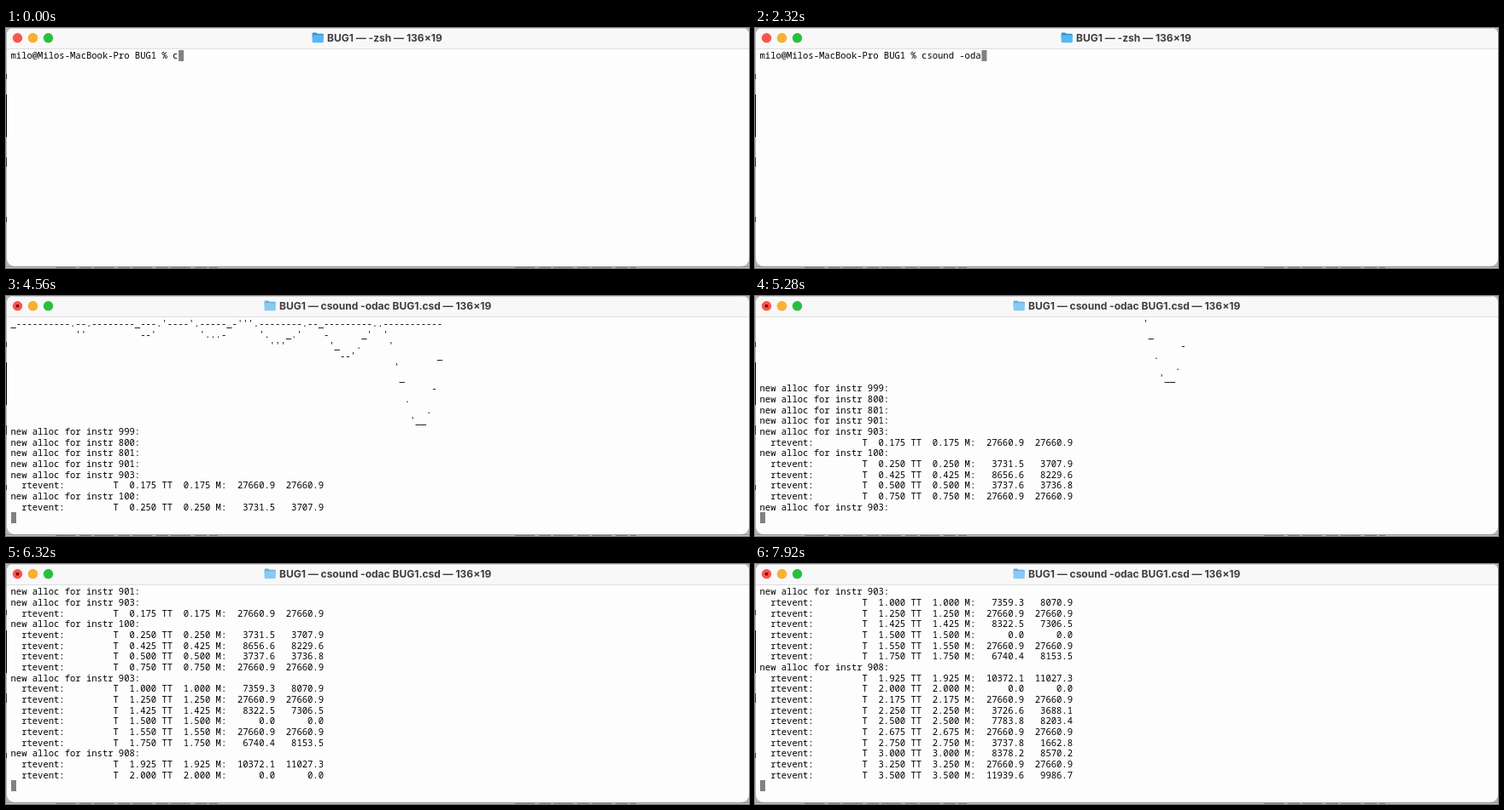
Animation of 870x282 px, one loop 8 s. Source, as an HTML page:

```html
<!DOCTYPE html>
<html lang="en">
<head>
<meta charset="utf-8">
<title>Terminal session</title>
<style>
  html, body { margin: 0; width: 100%; height: 100%; overflow: hidden; }
  #stage { position: relative; width: 870px; height: 282px; overflow: hidden; background: #b4b4b4; }
  #stage * { position: absolute; box-sizing: border-box; }
  #backdrop, #chrome { left: 0; top: 0; }
  #window { left: 1px; top: 0; width: 869px; height: 280px; border-radius: 8px 8px 9px 9px;
    background: #fdfdfd; overflow: hidden; }
  #bar { left: 0; top: 0; width: 100%; height: 25px; background: #f8f8f8;
    border-top: 1px solid #d2d2d2; border-bottom: 1px solid #dedede; }
  #title { top: 3px; font: 700 12px/17px Inter, sans-serif; color: #3d3d3d; white-space: pre; }
  #screen { left: 5.5px; top: 26.2px; margin: 0; color: #000; white-space: pre;
    font: 500 10.545px/12.667px "Noto Sans Mono", monospace; }
  #cursor { left: 5.5px; top: 26.2px; width: 6.33px; height: 12.7px; background: #818181; }
  .mark { top: 28px; width: 3px; height: 10px; border: 1px solid #a5a5a5; }
  #open { left: 2px; border-right: 0; }
  #close { left: 867px; border-left: 0; }
</style>
</head>
<body>
<div id="stage">
  <svg id="backdrop" width="870" height="282">
    <path d="M0 280.5H870" stroke="#929292"/>
    <path d="M0 281.5H870" stroke="#c4c4c4"/>
    <path d="M58 281.5H248M596 281.5H738" stroke="#858585" stroke-dasharray="23 5 14 3"/>
    <path d="M.5 54V60M.5 152V163M.5 222V228" stroke="#333"/>
    <path d="M.5 78V128" stroke="#000"/>
  </svg>
  <div id="window"><div id="bar"></div></div>
  <svg id="chrome" width="870" height="25">
    <g stroke-opacity=".12" stroke="#000" stroke-width=".6">
      <circle cx="13.5" cy="11.7" r="5.6" fill="#fe544b"/>
      <circle cx="31.5" cy="11.7" r="5.6" fill="#fdb02b"/>
      <circle cx="49.5" cy="11.7" r="5.6" fill="#25c239"/>
    </g>
    <circle id="dot" cx="13.5" cy="11.7" r="2" fill="#7d0a05"/>
    <g id="folder">
      <path d="M0 1.2Q0 0 1.2 0H4.6L6 1.4H12Q13.2 1.4 13.2 2.6V6H0Z" fill="#2f8fd0"/>
      <rect y="2.8" width="13.2" height="9" rx="1.1" fill="#55b8f2"/>
    </g>
  </svg>
  <div id="title"></div>
  <pre id="screen"></pre>
  <div id="cursor"></div>
  <div id="open" class="mark"></div>
  <div id="close" class="mark"></div>
</div>
<script>
const LOOP = 8000, STEP = 80, COLUMN = 6.327, ROW = 12.667, VISIBLE = 18;
const KEY_DELAY = 232, COMPLETED = 3440, ENTERED = 3840, NEWLINE = 4000, RUNNING = 4080, OUTPUT = 4320;
const PROMPT = "milo@Milos-MacBook-Pro BUG1 % ";
const COMMAND = "csound -odac BUG1.csd ";
const el = id => document.getElementById(id);

// Wave table plotted with four vertical levels per text row.
function plotWave() {
  const width = 80, axis = 36, tail = [23, 16, 9, 3, 0, 0, 5, 14, 24];
  const rows = Array.from({ length: 19 }, (_, r) => Array(width).fill(r === 9 ? "-" : " "));
  for (let x = 0; x < width; x++) {
    let sum = 0;
    for (let k = 1; k <= 6; k++) sum += Math.sin(2 * Math.PI * k * x / width);
    const wave = Math.round(axis * (1 + sum / 4.7));
    const level = x < 71 ? wave : tail[x - 71];
    rows[Math.floor(level / 4)][x] = "_.-'"[level % 4];
  }
  return rows.reverse().map(row => row.join("").trimEnd());
}

const alloc = n => `new alloc for instr ${n}:`;
function rtevent(time, left, right) {
  const clock = time.toFixed(3).padStart(7);
  const peak = v => v.toFixed(1).padStart(9);
  return "  rtevent:".padEnd(19) + `T${clock} TT${clock} M:${peak(left)}${peak(right)}`;
}

const LOUD = 27660.9;
// Score time, left peak, right peak, instrument allocated next
const events = [
  [0.175, LOUD, LOUD, 100],
  [0.25, 3731.5, 3707.9],
  [0.425, 8656.6, 8229.6],
  [0.5, 3737.6, 3736.8],
  [0.75, LOUD, LOUD, 903],
  [1, 7359.3, 8070.9],
  [1.25, LOUD, LOUD],
  [1.425, 8322.5, 7306.5],
  [1.5, 0, 0],
  [1.55, LOUD, LOUD],
  [1.75, 6740.4, 8153.5, 908],
  [1.925, 10372.1, 11027.3],
  [2, 0, 0],
  [2.175, LOUD, LOUD],
  [2.25, 3726.6, 3688.1],
  [2.5, 7783.8, 8203.4],
  [2.675, LOUD, LOUD],
  [2.75, 3737.8, 1662.8],
  [3, 8378.2, 8570.2],
  [3.25, LOUD, LOUD],
  [3.5, 11939.6, 9986.7],
];
const opening = [...plotWave(), ...[999, 800, 801, 901, 903].map(alloc)];

function linesAt(t) {
  if (t < OUTPUT) {
    const typed = t < COMPLETED ? Math.min(14, Math.floor(t / KEY_DELAY) + 1) : COMMAND.length;
    const line = PROMPT + COMMAND.slice(0, typed);
    return t < NEWLINE ? [line] : [line, ""];
  }
  const lines = [...opening];
  for (const [time, left, right, next] of events) {
    if (4300 + time * 988 > t) break;
    lines.push(rtevent(time, left, right));
    if (next) lines.push(alloc(next));
  }
  return [...lines.slice(-VISIBLE), ""];
}

let shown = -1;
function draw(t) {
  if (t === shown) return;
  shown = t;
  const lines = linesAt(t), running = t >= RUNNING;
  const row = lines.length - 1, column = lines[row].length;
  el("screen").textContent = lines.join("\n");
  el("cursor").style.transform = `translate(${column * COLUMN}px, ${row * ROW}px)`;
  el("title").textContent = `BUG1 — ${running ? "csound -odac BUG1.csd" : "-zsh"} — 136×19`;
  el("title").style.left = running ? "320px" : "376px";
  el("folder").setAttribute("transform", `translate(${running ? 302.6 : 358.6} 5.4)`);
  el("folder").setAttribute("opacity", running ? 0.7 : 1);
  el("dot").style.display = running ? "" : "none";
  const marked = t >= ENTERED && t < OUTPUT;
  for (const id of ["open", "close"]) el(id).style.display = marked ? "" : "none";
}

const start = performance.now();
function tick() {
  const t = (performance.now() - start) % LOOP;
  draw(Math.floor(t / STEP) * STEP);
  requestAnimationFrame(tick);
}
tick();
</script>
</body>
</html>
```
